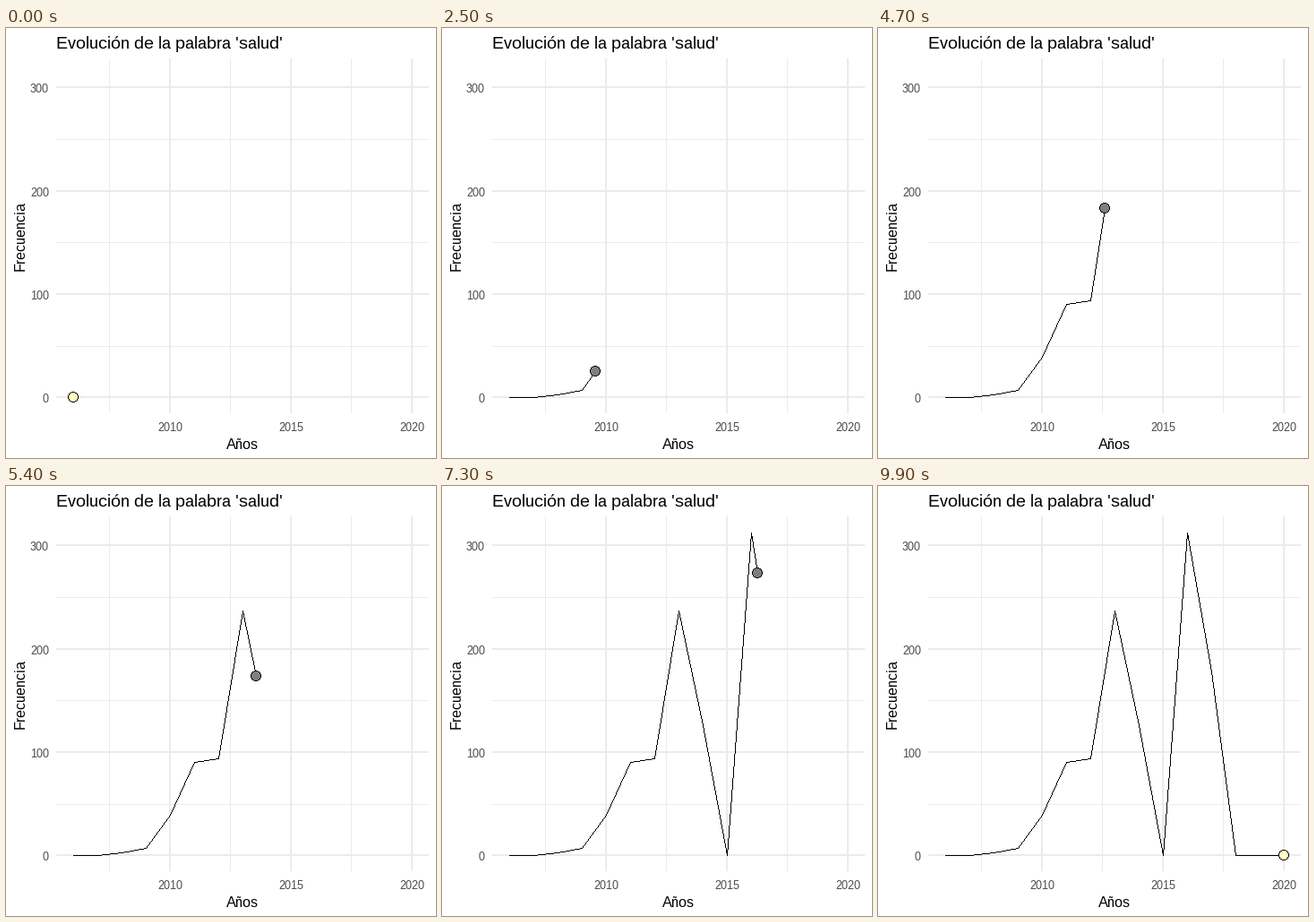
Recreate the animation shown at these times as a matplotlib script. Size 480 px wide and 480 px high, loop 10000 ms.

```python
import matplotlib.pyplot as plt
import numpy as np
from matplotlib.animation import FuncAnimation
from matplotlib.patches import Rectangle

SIZE, DPI = 480, 100
FRAMES, INTERVAL = 100, 100
GRID, LABEL = "#EBEBEB", "#4D4D4D"
YELLOW, GREY = np.array([255, 255, 191]), np.array([127, 127, 127])

FIRST_YEAR = 2006
COUNTS = np.array([0, 0, 3, 7, 39, 90, 94, 237, 126, 0, 312, 178, 0, 0, 0])
STEPS = np.arange(len(COUNTS))
# Each year lands on a whole frame
KEYS = np.floor((FRAMES - 1) * STEPS / STEPS[-1] + 0.5)
FILLS = np.where(COUNTS[:, None] == 0, YELLOW, GREY)

plt.rcParams.update({
    "font.family": "Liberation Sans",
    "text.hinting": "native",
    "text.hinting_factor": 1,
})


def px(step):
    return int(75.05 + 27 * step)


def py(count):
    return int(412.7 - 1.153 * count)


fig = plt.figure(figsize=(SIZE / DPI, SIZE / DPI), dpi=DPI, facecolor="white")
ax = fig.add_axes([0, 0, 1, 1])
ax.axis("off")

LEFT, RIGHT, TOP, BOTTOM = 56, 472, 34, 430


def bar(x, y, w, h):
    ax.add_patch(Rectangle((x, y), w, h, fc=GRID, lw=0, antialiased=False))


def write(x, y, text, size, color="black", **kw):
    ax.text(x, y, text, fontsize=size * 72 / DPI, color=color,
            va="baseline", **kw)


for count in (50, 150, 250):
    bar(LEFT, py(count), RIGHT - LEFT, 1)
for step in (1.5, 6.5, 11.5):
    bar(px(step), TOP, 1, BOTTOM - TOP)
for count in (0, 100, 200, 300):
    bar(LEFT, py(count) - 1, RIGHT - LEFT, 2)
    write(48, py(count) + 6, str(count), 13, LABEL, ha="right")
for year in (2010, 2015, 2020):
    x = px(year - FIRST_YEAR)
    bar(x - 1, TOP, 2, BOTTOM - TOP)
    write(x, 450, str(year), 13, LABEL, ha="center")

write(56, 23, "Evolución de la palabra 'salud'", 19, ha="left")
write(264, 470, "Años", 16, ha="center")
write(21, 232, "Frecuencia", 16, ha="center", rotation=90,
      rotation_mode="anchor")

# Round marker, 12 px wide, with a one-pixel rim
R = 6
off = np.arange(-R, R) + 0.5
disc = np.hypot(off[:, None], off) < R
pad = np.pad(disc, 1)
inner = (disc & pad[:-2, 1:-1] & pad[2:, 1:-1]
         & pad[1:-1, :-2] & pad[1:-1, 2:])
rim = disc & ~inner

layer = ax.imshow(np.zeros((SIZE, SIZE, 4), np.uint8),
                  extent=(0, SIZE, SIZE, 0), interpolation="nearest",
                  aspect="auto", zorder=5)
ax.set_xlim(0, SIZE)
ax.set_ylim(SIZE, 0)


def stroke(img, a, b):
    """Crisp one-pixel line between two pixels."""
    n = max(abs(b[0] - a[0]), abs(b[1] - a[1])) + 1
    xs = np.floor(np.linspace(a[0], b[0], n) + 0.5).astype(int)
    ys = np.floor(np.linspace(a[1], b[1], n) + 0.5).astype(int)
    img[ys, xs] = (0, 0, 0, 255)


def update(i):
    step = np.interp(i, KEYS, STEPS)
    head = px(step), py(np.interp(step, STEPS, COUNTS))
    fill = [round(np.interp(step, STEPS, FILLS[:, c])) for c in range(3)]

    img = np.zeros((SIZE, SIZE, 4), np.uint8)
    path = [(px(s), py(COUNTS[s])) for s in STEPS if s < step] + [head]
    for a, b in zip(path, path[1:]):
        stroke(img, a, b)

    x, y = head
    spot = img[y - R:y + R, x - R:x + R]
    spot[inner] = fill + [255]
    spot[rim] = (0, 0, 0, 255)
    layer.set_data(img)
    return [layer]


anim = FuncAnimation(fig, update, frames=FRAMES, interval=INTERVAL,
                     repeat=True, repeat_delay=0)
plt.show()
```
